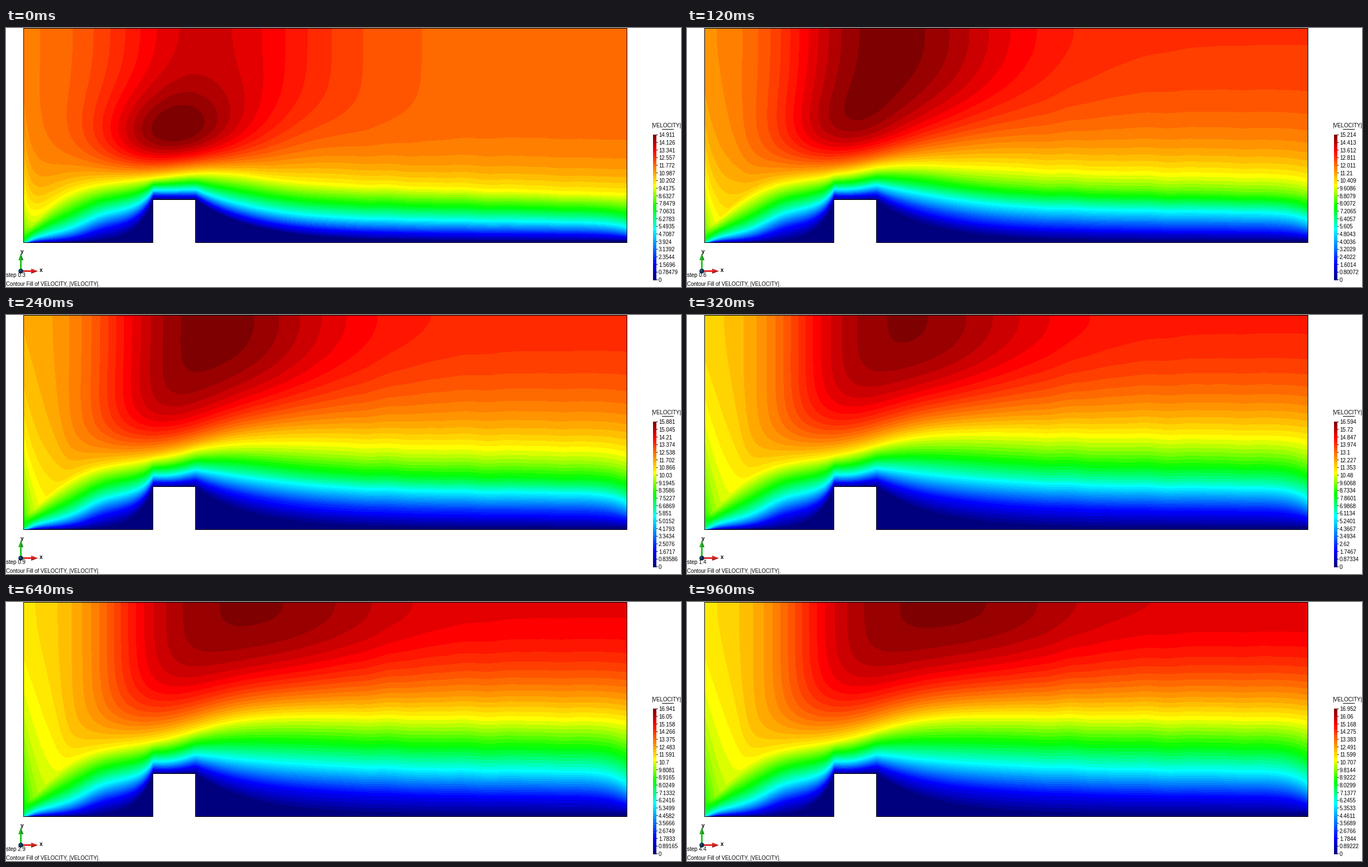
These frames come from a looping animation (1206x464 px, 1000 ms). A matplotlib script:

```python
import numpy as np
import matplotlib.pyplot as plt
from matplotlib.animation import FuncAnimation
from matplotlib.colors import LinearSegmentedColormap
from matplotlib.patches import Circle, Polygon, Rectangle

W, H, DPI = 1206, 464, 64
LEFT, RIGHT, FLOOR = 31, 1110, 385
TOP = FLOOR - 1
BLOCK_L, BLOCK_R, BLOCK_Y = 263, 339, 308
BANDS, FRAMES = 50, 25
EDGE = 0.65  # relative speed where the wall layer meets the outer flow

# Simulated time and peak speed
PEAK_T = [0.3, 0.6, 0.9, 1.4, 2.2, 2.9, 4.4]
PEAK_V = [14.91102, 15.21362, 15.88134, 16.59354, 16.89594, 16.94135, 16.95209]


def ramp(x, mid, width):
    return 1 / (1 + np.exp(-(x - mid) / width))


def bump(x, mid, width):
    return np.exp(-((x - mid) / width) ** 2 / 2)


x = np.arange(LEFT, RIGHT) + 0.5
inlet = x - LEFT
mesh = ramp(x, 600, 25) * ramp(-x, -1020, 15) * (0.8 * np.sin(x / 19) + 0.6 * np.sin(x / 11.3 + 1))
h = (TOP - np.arange(FLOOR))[:, None] * np.ones_like(x)
h = np.clip(h + mesh * np.clip(h / 120, 0, 1), 0, TOP)


def still_layer(rest):
    """Height of the nearly still fluid around the block."""
    crest = BLOCK_Y and TOP - BLOCK_Y + 2
    before = 2 * (1 - np.exp(-inlet / 60)) + (crest - 2) * np.exp((x - BLOCK_L) / 30)
    after = rest + (crest - rest) * np.exp((BLOCK_R - x) / 100)
    return np.minimum(np.minimum(before, after), crest)


def speed_field(still, edge, edge_speed, bend, top, sharp):
    """Relative speed: wall layer up to the edge, then a rise towards the top."""
    u = np.clip((h - still) / (edge - still), 0, 1) ** (1 / bend)
    layer = np.interp(u, [0, 0.2, 0.48, 0.73, 1], [0.03, 0.17, 0.54, 0.77, 1])
    layer *= np.clip(h / np.maximum(still, 0.1), 0, 1)
    rise = 1 - (1 - np.clip((h - edge) / (TOP - edge), 0, 1)) ** sharp
    return edge_speed * layer + (top - edge_speed) * rise, rise


# Near the inlet the wall layer is thin and steep.
near_inlet = np.exp(-(inlet / 110) ** 4) + 8 * np.exp(-inlet / 6)
near_outlet = 0.4 * np.exp((x - RIGHT) / 25)
thin = 29 * np.exp(-inlet / 15)


def starting_flow():
    edge = (thin + 108 * np.tanh(inlet / 75) + 16 * bump(x, 365, 85)
            - 0.033 * np.maximum(x - 430, 0))
    hump = 0.14 * bump(x, 339, np.where(x < 339, 128, 165))
    field, rise = speed_field(
        still_layer(4), edge,
        edge_speed=EDGE - 0.076 * np.exp(-inlet / 25),
        bend=1 + near_inlet + near_outlet + 0.3 * ramp(x, 265, 12),
        top=0.766 + 0.027 * ramp(x, 280, 60) + hump,
        sharp=6 - 3.6 * np.exp(-inlet / 20) - 2 * bump(x, 540, 90))
    jet = 0.16 * rise * bump(x, 290, 82) * bump(h, 159, 68)
    return field + jet


def steady_flow():
    edge = (thin + 126 * np.tanh(inlet / 85) + 55 * ramp(x, 337, 48)
            - 0.012 * np.maximum(x - 520, 0) - 6 * ramp(x, 1090, 10))
    field, _ = speed_field(
        still_layer(6), edge,
        edge_speed=EDGE - 0.147 * np.exp(-inlet / 25),
        bend=1 + near_inlet + near_outlet + 0.45 * bump(x, 288, 32) + 0.1 * ramp(x, 700, 80),
        top=0.66 + 0.33 * ramp(x, 196, 52) - 0.07 * ramp(x, 655, 60),
        sharp=2 + 5 * np.exp((130 - x) / 165) * ramp(x, 105, 8))
    return field


start = starting_flow() * PEAK_V[0]
steady = steady_flow() * PEAK_V[-1]
# The flow settles sooner around the block and close to the wall.
haste = (1 + 1.25 * ramp(-x, -460, 55)) * (1 + 1.6 * np.exp(-(h / 95) ** 2))

palette = LinearSegmentedColormap.from_list("rainbow_bands", [
    (0, (0, 0, 0.5)), (5 / 49, (0, 0, 1)), (17 / 49, (0, 1, 1)), (0.5, (0, 1, 0)),
    (32 / 49, (1, 1, 0)), (44 / 49, (1, 0, 0)), (1, (0.5, 0, 0))], N=BANDS)

fig = plt.figure(figsize=(W / DPI, H / DPI), dpi=DPI, facecolor="white")
ax = fig.add_axes([0, 0, 1, 1])
ax.axis("off")


def px(size):
    return size * 72 / DPI


def bands(data, extent):
    return ax.imshow(data, cmap=palette, vmin=-0.5, vmax=BANDS - 0.5, extent=extent,
                     interpolation="nearest", aspect="auto", zorder=1)


def line(xs, ys, color="black", width=1):
    ax.plot(xs, ys, color=color, lw=px(width), snap=False, zorder=3,
            solid_capstyle="butt", solid_joinstyle="miter")


def text(x, y, s, size=9.8, **kw):
    kw = dict(family="Liberation Sans", va="center_baseline", color="black") | kw
    return ax.text(x, y, s, fontsize=px(size), **kw)


def arrow(tip, along, color, shade):
    """Cone seen from the side, with one half in shade."""
    (tx, ty), (dx, dy) = tip, along
    bx, by = tx - 12 * dx, ty - 12 * dy
    far = (bx + 4.5 * abs(dy), by + 4.5 * abs(dx))
    near = (bx - 4.5 * abs(dy), by - 4.5 * abs(dx))
    ax.add_patch(Polygon([tip, near, far], color=color, lw=0, zorder=3))
    ax.add_patch(Polygon([tip, (bx + abs(dy), by + abs(dx)), far], color=shade, lw=0, zorder=3))


flow = bands(np.zeros(start.shape), (LEFT, RIGHT, FLOOR, 0))
bands(np.arange(BANDS)[::-1, None], (1156, 1162, 452, 191))
ax.set_xlim(0, W)
ax.set_ylim(H, 0)

# Domain outline and obstacle
ax.add_patch(Rectangle((BLOCK_L, BLOCK_Y), BLOCK_R - BLOCK_L, FLOOR + 1 - BLOCK_Y,
                       color="white", lw=0, zorder=2))
l, r, base = LEFT + 0.5, RIGHT - 0.5, FLOOR - 0.5
bl, br, by = BLOCK_L - 0.5, BLOCK_R - 0.5, BLOCK_Y - 0.5
line([bl, l, l, r, r, br, br, bl, bl], [base, base, 0.5, 0.5, base, base, by, by, base])

# Legend
text(1153, 174.5, "|VELOCITY|")
line([1172, 1193], [181.5, 181.5])
label_y = np.linspace(191.3, 451, 20)
for y in label_y:
    line([1162, 1164.5], [y, y])
labels = [text(1166, y, "") for y in label_y]

# Axis triad
line([26.5, 26.5], [433, 414], "#20c820", 3)
line([29, 47], [435.5, 435.5], "#e62828", 3)
arrow((26.5, 404), (0, -1), "#28b428", "#1c8c1c")
arrow((57, 435.5), (1, 0), "#dc2828", "#a01c1c")
ax.add_patch(Circle((26.5, 435.5), 4.3, color="#0c2c4c", lw=0, zorder=3))
ax.add_patch(Circle((25.5, 434.5), 1.7, color="#1c5a80", lw=0, zorder=3))
text(29, 400, "y", weight="bold", ha="center")
text(62.5, 433, "x", weight="bold", ha="center")

step_label = text(0, 442.5, "", zorder=4)
text(0, 458.5, "Contour Fill of VELOCITY, |VELOCITY|.", 9.5)


def sim_time(i):
    return round(0.3 + 0.1 * i if i <= 6 else 1.41 + 0.1875 * (i - 8), 1)


def draw(i):
    t = sim_time(i)
    peak = np.interp(t, PEAK_T, PEAK_V)
    speed = steady + (start - steady) * np.exp((0.3 - t) * haste)
    flow.set_data(np.clip(np.floor(speed / peak * BANDS), 0, BANDS - 1))
    for k, label in enumerate(labels):
        label.set_text(f"{peak * (19 - k) / 19:.5g}")
    step_label.set_text(f"step {t:.1f}")
    return [flow, step_label, *labels]


anim = FuncAnimation(fig, draw, frames=FRAMES, interval=1000 / FRAMES,
                     repeat=True, repeat_delay=0, blit=False)
plt.show()
```
